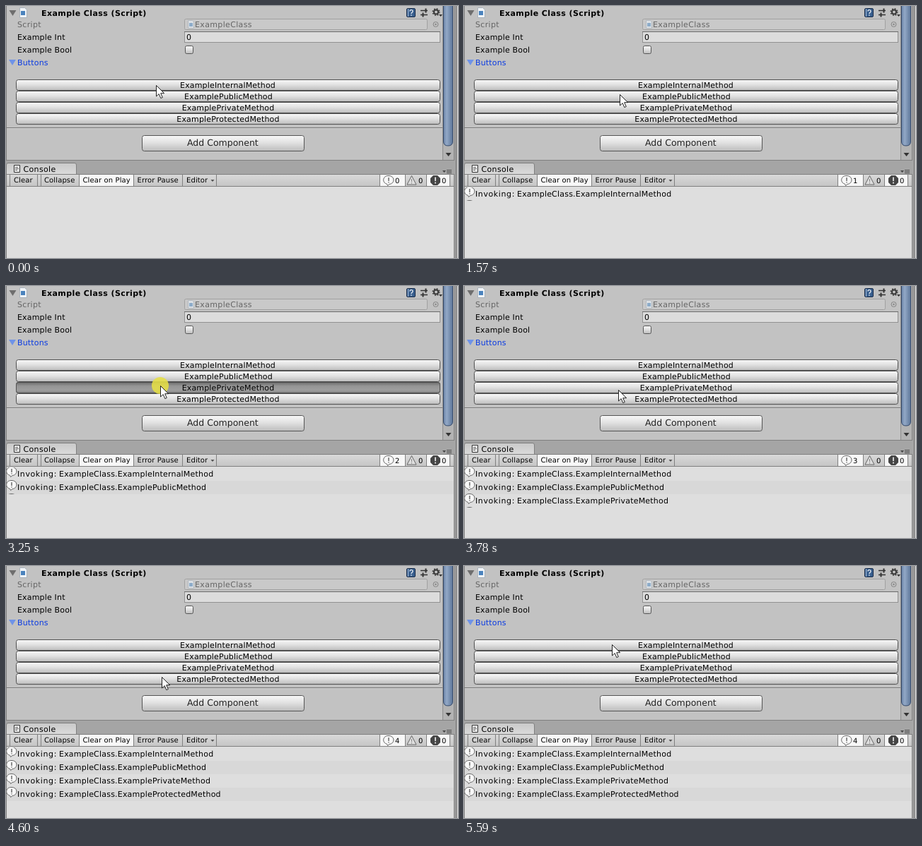
Recreate the animation shown at these times as an HTML page. Size 639 px wide and 357 px high, loop 6800 ms.

```html
<!DOCTYPE html>
<html lang="en">
<head>
<meta charset="utf-8">
<title>Inspector method buttons</title>
<style>
html, body { margin: 0; width: 100%; height: 100%; overflow: hidden; background: #a5a5a5; }
svg { display: block; width: 100%; height: 100%; }
text {
  font: 11px "DejaVu Sans", Verdana, sans-serif;
  letter-spacing: .17px;
  text-rendering: geometricPrecision;
  fill: #000;
}
.title { font-weight: bold; letter-spacing: .42px; }
.dim { fill: #666; letter-spacing: .35px; }
.link { fill: #0a3be2; }
.mid { text-anchor: middle; }
.tab { letter-spacing: .35px; }
.log text { letter-spacing: .6px; }
.log tspan { letter-spacing: .2px; }
.bar text { font-size: 10px; letter-spacing: .12px; }
.add { font-size: 12.5px; letter-spacing: 0; fill: #222; }

.count, .cover, .press, .halo, .cursor { animation: 6.8s infinite step-end; }
.count { --row: -19px; animation-name: advance; }
.cover { --row: 19px; animation-name: advance; }
.press { animation-name: press; }
.halo { animation-name: halo; }
.cursor { animation-name: move; }

@keyframes advance {
  0% { transform: translateY(0); }
  16.32% { transform: translateY(var(--row)); }
  35.44% { transform: translateY(calc(var(--row) * 2)); }
  53.08% { transform: translateY(calc(var(--row) * 3)); }
  67.64%, 100% { transform: translateY(calc(var(--row) * 4)); }
}
@keyframes press {
  0%, 15.88%, 33.82%, 50.88%, 67.64%, 100% { opacity: 0; transform: translateY(0); }
  13.23% { opacity: 1; transform: translateY(0); }
  30.73% { opacity: 1; transform: translateY(16px); }
  47.79% { opacity: 1; transform: translateY(32px); }
  65.88% { opacity: 1; transform: translateY(48px); }
}
@keyframes halo {
  0%, 15.88%, 33.82%, 50.88%, 67.64%, 100% { opacity: 0; }
  13.23%, 30.73%, 47.79%, 65.88% { opacity: 1; }
}
@keyframes move {
  0% { transform: translate(212px, 112px); }
  .88% { transform: translate(211px, 111px); }
  18.78% { transform: translate(211px, 111px); animation-timing-function: steps(8); }
  23.08% { transform: translate(220px, 125px); }
  35.38% { transform: translate(220px, 125px); animation-timing-function: steps(11); }
  40.88% { transform: translate(218px, 141px); }
  53.08% { transform: translate(218px, 141px); animation-timing-function: steps(5); }
  55.58% { transform: translate(218px, 147px); animation-timing-function: steps(10); }
  63.23% { transform: translate(220px, 157px); }
  73.29% { transform: translate(220px, 157px); animation-timing-function: steps(23); }
  82.2%, 100% { transform: translate(209px, 111px); }
}
</style>
</head>
<body>
<svg viewBox="0 0 639 357">
  <defs>
    <linearGradient id="raised" x2="0" y2="1">
      <stop stop-color="#f8f8f8"/><stop offset=".45" stop-color="#e2e2e2"/><stop offset="1" stop-color="#bcbcbc"/>
    </linearGradient>
    <linearGradient id="sunk" x2="0" y2="1">
      <stop stop-color="#6c6c6c"/><stop offset=".35" stop-color="#959595"/>
      <stop offset=".75" stop-color="#9e9e9e"/><stop offset="1" stop-color="#828282"/>
    </linearGradient>
    <linearGradient id="strip" x2="0" y2="1">
      <stop stop-color="#d9d9d9"/><stop offset="1" stop-color="#c3c3c3"/>
    </linearGradient>
    <linearGradient id="tab" x2="0" y2="1">
      <stop stop-color="#c9c9c9"/><stop offset="1" stop-color="#dcdcdc"/>
    </linearGradient>
    <linearGradient id="thumb">
      <stop stop-color="#6d86aa"/><stop offset=".35" stop-color="#92a8c6"/><stop offset="1" stop-color="#5d7699"/>
    </linearGradient>
    <rect id="button" x="14.5" y="104.5" width="599" height="15" rx="3" stroke="#505050"/>
    <g id="info">
      <path d="M0-6.5a6.5 6 0 0 1 1 12l-2.5 2-.8-2.2a6.5 6 0 0 1 2.3-11.8z" fill="#f8f8f8" stroke="#666"/>
      <path d="M0-4V1M0 2.3V3.6" stroke="#555" stroke-width="1.3"/>
    </g>
    <clipPath id="digits"><rect x="549" y="241" width="14" height="14"/></clipPath>
    <clipPath id="labels"><path d="M14 104h600v14H14zm0 16h600v14H14zm0 16h600v14H14zm0 16h600v14H14z"/></clipPath>
    <clipPath id="list"><rect x="1" y="257" width="633" height="100"/></clipPath>
  </defs>

  <!-- Inspector -->
  <rect width="634" height="218" fill="#c2c2c2"/>
  <path d="M4.5 6h10l-5 8z" fill="#6e6e6e"/>
  <path d="M19.5 2.5h7l3 3v11h-10z" fill="#f1f4f7" stroke="#a9b2bb"/>
  <rect x="21" y="7" width="6" height="6" fill="#4b83bd"/>
  <text class="title" x="50" y="14">Example Class (Script)</text>

  <rect x="566.5" y="3.5" width="12" height="12" rx="1.5" fill="#395f8e" stroke="#1d2f4b"/>
  <path d="M568.5 4v11" stroke="#a9c0dd"/>
  <path d="M571 7.5q0-2 2-2t2 2q0 1-1 1.7t-1 1.8M573 12.3v1.5" fill="none" stroke="#fff" stroke-width="1.2"/>
  <path d="M586 6.5h10M586 12.5h10" stroke="#333" stroke-width="1.3"/>
  <path d="M593.5 3.5v6M589.5 9.5v6" stroke="#333" stroke-width="2"/>
  <circle cx="608" cy="8.5" r="3" fill="none" stroke="#3a3a3a" stroke-width="2"/>
  <circle cx="608" cy="8.5" r="4.7" fill="none" stroke="#3a3a3a" stroke-width="1.6" stroke-dasharray="1.85"/>
  <path d="M612 12h5l-2.5 3z" fill="#333"/>

  <text class="dim" x="16" y="30">Script</text>
  <rect x="252.5" y="18.5" width="343" height="15" rx="2" fill="#c9c9c9" stroke="#a0a0a0"/>
  <path d="M257.5 20.5h6l2 2v9h-8z" fill="#dde1e5" stroke="#b1b7bd"/>
  <rect x="259" y="24" width="5" height="5" fill="#8dacc9"/>
  <text class="dim" x="267" y="30">ExampleClass</text>
  <circle cx="607.5" cy="26" r="3.5" fill="none" stroke="#858585"/>
  <circle cx="607.5" cy="26" r="1.2" fill="#858585"/>

  <text x="16" y="48">Example Int</text>
  <rect x="252.5" y="36.5" width="361" height="15" fill="#dcdcdc" stroke="#929292"/>
  <path d="M252 36.5h362" stroke="#6b6b6b"/>
  <text x="255" y="48">0</text>
  <text x="16" y="66">Example Bool</text>
  <rect x="253.5" y="56.5" width="11" height="11" rx="2" fill="url(#raised)" stroke="#555"/>
  <path d="M4 76h10l-5 8z" fill="#6e93e8"/>
  <text class="link" x="16" y="84">Buttons</text>

  <g fill="url(#raised)">
    <use href="#button"/><use href="#button" y="16"/><use href="#button" y="32"/><use href="#button" y="48"/>
  </g>
  <use class="press" href="#button" fill="url(#sunk)"/>
  <g class="mid" clip-path="url(#labels)">
    <text x="313.5" y="116">ExampleInternalMethod</text>
    <text x="314.5" y="132">ExamplePublicMethod</text>
    <text x="314" y="148">ExamplePrivateMethod</text>
    <text x="314" y="164">ExampleProtectedMethod</text>
  </g>

  <path d="M1 172.5h617" stroke="#777"/>
  <path d="M1 173.5h617" stroke="#d0d0d0"/>
  <rect x="192.5" y="183.5" width="229" height="22" rx="3" fill="url(#raised)" stroke="#555"/>
  <text class="add" x="256" y="198">Add Component</text>

  <!-- Scrollbar -->
  <rect x="618" width="15" height="218" fill="#b3b3b3"/>
  <path d="M617.5 0v218" stroke="#8c8c8c"/>
  <path d="M618.5-8h13v200q0 6-6.5 6t-6.500-6z" fill="url(#thumb)" stroke="#34496a"/>
  <path d="M621.5 208h8l-4 5z" fill="#333"/>

  <!-- Panel edges -->
  <path d="M0 218.5h634M633.5 0v218M.5 0v218" stroke="#808080"/>
  <rect x="637" width="2" height="357" fill="#c2c2c2"/>
  <path d="M636.5 0v357" stroke="#656565"/>

  <!-- Console -->
  <path d="M.5 240v-15q0-2.5 2.5-2.5h94q2.500 0 2.500 2.5v15z" fill="url(#tab)" stroke="#808080"/>
  <path d="M11.5 225.5h8v10h-8z" fill="#eee" stroke="#333"/>
  <path d="M13 228.500h4M13 230.500h5M13 232.500h3" stroke="#666"/>
  <text class="tab" x="24.5" y="235">Console</text>
  <path d="M617 233h5l-2.5 3z" fill="#444"/>
  <path d="M623 232.5h7M623 234.5h7M623 236.5h7" stroke="#555"/>

  <g class="bar">
    <rect y="239" width="634" height="18" fill="url(#strip)"/>
    <path d="M104 239h76v17h-76zM529 239h35v17h-35zM595 239h32v17h-32z" fill="#f7f7f7"/>
    <path d="M0 238.5h634M0 255.5h634M5.5 239v17M44.5 239v17M49.5 239v17M103.5 239v17M180.5 239v17M249.5 239v17M297.5 239v17M528.5 239v17M564.5 239v17M594.5 239v17M627.5 239v17" stroke="#808080"/>
    <text x="11" y="250">Clear</text>
    <text x="54" y="250">Collapse</text>
    <text x="108.5" y="250">Clear on Play</text>
    <text x="185.5" y="250">Error Pause</text>
    <text x="255" y="250">Editor</text>
    <path d="M289.5 246h5l-2.5 3z" fill="#555"/>
    <use href="#info" x="541" y="247"/>
    <g clip-path="url(#digits)">
      <g class="count">
        <text x="550" y="251">0</text><text x="550" y="270">1</text><text x="550" y="289">2</text>
        <text x="550" y="308">3</text><text x="550" y="327">4</text>
      </g>
    </g>
    <path d="M573.5 240.5l6.5 12.5h-13z" fill="#dedede" stroke="#666" stroke-linejoin="round"/>
    <path d="M573.5 245v4M573.5 250v1.5" stroke="#888"/>
    <text x="583" y="251">0</text>
    <path d="M604 240h6l4 4v6l-4 4h-6l-4-4v-6z" fill="#454545"/>
    <path d="M607 242.5v5.5M607 249.5v2" stroke="#fff" stroke-width="1.5"/>
    <text x="616" y="251">0</text>
  </g>

  <rect y="256" width="634" height="101" fill="#dedede"/>
  <g class="log" clip-path="url(#list)">
    <path d="M1 276h633v19H1zM1 314h633v19H1z" fill="#d8d8d8"/>
    <use href="#info" x="8" y="263"/><use href="#info" x="8" y="282"/>
    <use href="#info" x="8" y="301"/><use href="#info" x="8" y="320"/>
    <text x="16" y="270">Invoking:<tspan x="75">ExampleClass.ExampleInternalMethod</tspan></text>
    <text x="16" y="289">Invoking:<tspan x="75">ExampleClass.ExamplePublicMethod</tspan></text>
    <text x="16" y="308">Invoking:<tspan x="75">ExampleClass.ExamplePrivateMethod</tspan></text>
    <text x="16" y="327">Invoking:<tspan x="75">ExampleClass.ExampleProtectedMethod</tspan></text>
    <rect class="cover" x="1" y="257" width="633" height="100" fill="#dedede"/>
  </g>
  <path d="M.5 239v118M633.5 239v118" stroke="#808080"/>

  <g class="cursor">
    <circle class="halo" r="12" fill="#e6df45" fill-opacity=".88"/>
    <path d="M.5.5V16l3.7-3.4 2.6 6 2.5-1.1-2.6-5.8h5z" fill="#fff" stroke="#222"/>
  </g>
</svg>
</body>
</html>
```
